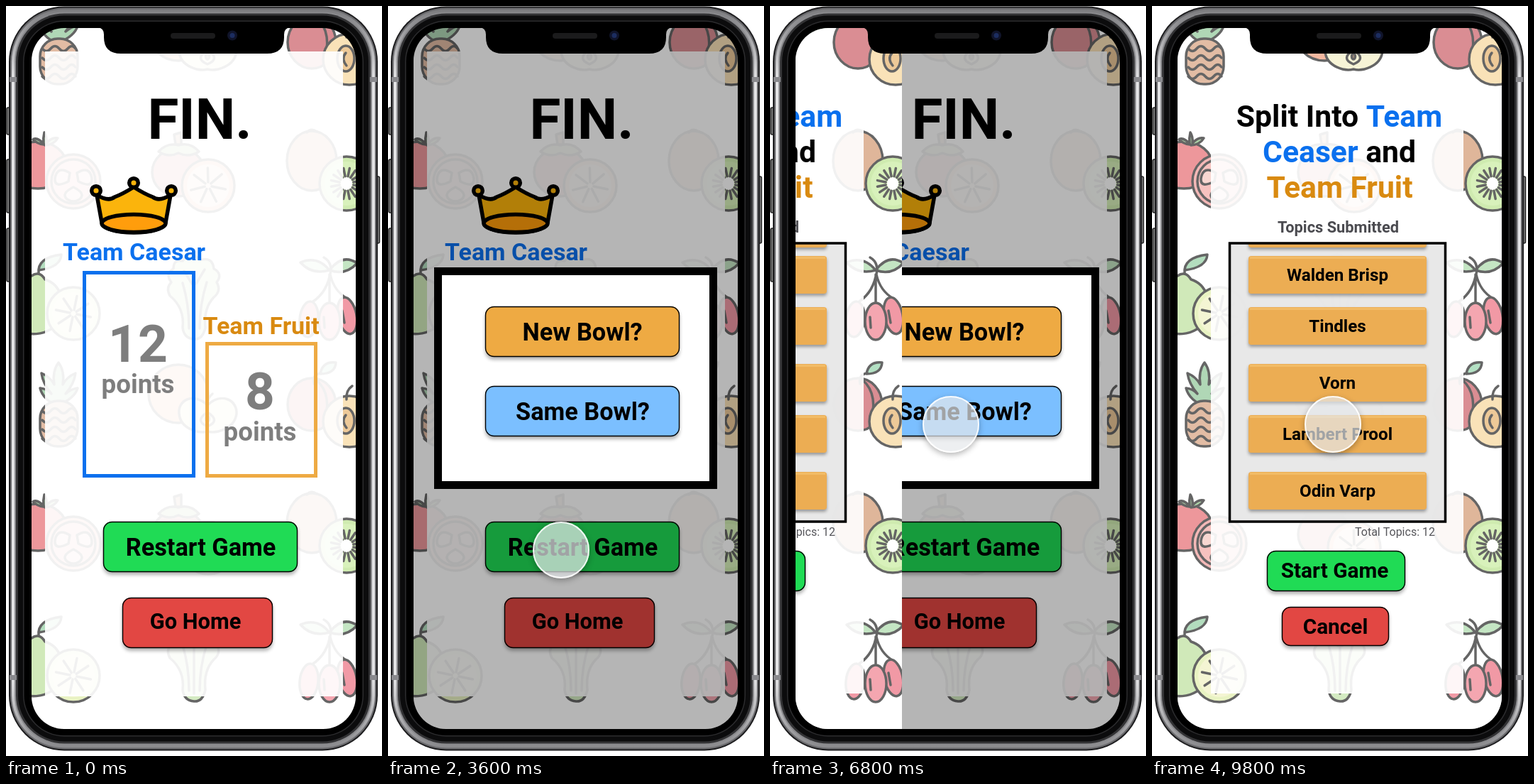
These frames come from a looping animation (530 by 1056 pixels, 9.9 s). An HTML page with a canvas:

```html
<!DOCTYPE html>
<html lang="en">
<head>
<meta charset="utf-8">
<title>Bowl game</title>
<style>
html, body { margin: 0; width: 100%; height: 100%; overflow: hidden; background: #fff; }
canvas { display: block; }
</style>
</head>
<body>
<canvas id="stage" width="530" height="1056"></canvas>
<script>
const W = 530, H = 1056, LOOP = 9900, STEP = 100;
const SCREEN = { x: 36, y: 31, w: 457, h: 987, r: 46 };
const BLUE = '#0a70ee', GOLD = '#d98a10', ORANGE = '#eeaa43', GREEN = '#20db55', RED = '#e24743';
const stage = document.getElementById('stage').getContext('2d');
let g = stage;

function box(x, y, w, h, r, fill, line, lw) {
  g.beginPath();
  g.roundRect(x, y, w, h, r);
  if (fill) { g.fillStyle = fill; g.fill(); }
  if (line) { g.strokeStyle = line; g.lineWidth = lw; g.stroke(); }
}

function text(str, x, y, size, color = '#000', weight = 700, align = 'center') {
  g.font = `${weight} ${size}px Roboto, sans-serif`;
  g.textAlign = align;
  g.fillStyle = color;
  g.fillText(str, x, y);
}

// Several coloured runs on one centred line
function runs(parts, cx, y, size) {
  g.font = `700 ${size}px Roboto, sans-serif`;
  const widths = parts.map(p => g.measureText(p[0]).width);
  let x = cx - widths.reduce((a, b) => a + b) / 2;
  parts.forEach(([str, color], i) => {
    text(str, x, y, size, color, 700, 'left');
    x += widths[i];
  });
}

function shadow(draw, alpha = 0.3, dy = 4, blur = 5) {
  g.save();
  g.shadowColor = `rgba(0,0,0,${alpha})`;
  g.shadowOffsetY = dy;
  g.shadowBlur = blur;
  draw();
  g.restore();
}

function button(x, y, w, h, fill, label, cx, base, size) {
  shadow(() => box(x, y, w, h, 12, fill));
  box(x + 0.5, y + 0.5, w - 1, h - 1, 12, null, '#000', 1.4);
  text(label, cx, base, size);
}

function layer(draw) {
  const c = document.createElement('canvas');
  c.width = W;
  c.height = H;
  const before = g;
  g = c.getContext('2d');
  draw();
  g = before;
  return c;
}

// ---- Fruit pattern ----
function oval(x, y, rx, ry, fill, rot = 0, line = true) {
  g.beginPath();
  g.ellipse(x, y, rx, ry, rot, 0, 7);
  if (fill) { g.fillStyle = fill; g.fill(); }
  if (line) g.stroke();
}

function shape(d, fill) {
  const p = new Path2D(d);
  if (fill) { g.fillStyle = fill; g.fill(p); }
  g.stroke(p);
}

function spokes(x, y, r0, r1, n) {
  for (let i = 0; i < n; i++) {
    const a = i * 2 * Math.PI / n + 0.2, c = Math.cos(a), s = Math.sin(a);
    g.beginPath();
    g.moveTo(x + c * r0, y + s * r0);
    g.lineTo(x + c * r1, y + s * r1);
    g.stroke();
  }
}

function slice(x, y, rim, flesh, n) {
  oval(x, y, 37, 37, rim);
  oval(x, y, 30, 30, flesh, 0, false);
  spokes(x, y, 5, 25, n);
}

function stoneRow() {
  // pineapple
  shape('M74 562C62 560 51 550 48 538Q58 539 64 546Q52 532 50 517Q62 522 68 533Q65 514 74 502Q83 514 80 533Q86 522 98 517Q96 532 84 546Q92 539 101 538Q97 552 74 562Z', '#7cbd86');
  box(48, 556, 53, 64, 25, '#d09168', '#000', 3.5);
  for (let y = 570; y < 615; y += 13)
    shape(`M51 ${y}q6 7 12 0t12 0t12 0t11 0`);
  // apricot and apple half
  oval(243, 546, 42, 41, '#ef8c62');
  shape('M284 562C264 543 242 555 244 574C246 596 272 602 284 599C296 602 322 596 325 574C326 555 304 543 284 562Z', '#f2eebc');
  shape('M284 572q-19 12 0 20q19-8 0-20ZM284 560q0-8 7-14');
  oval(284, 581, 2.5, 4, '#80502a');
  // plum and its half
  shape('M443 518Q446 500 465 502Q464 518 443 518Z', '#82cc9c');
  oval(431, 561, 34, 37, '#c2424c');
  shape('M434 532Q431 519 444 517M438 527Q461 547 448 592');
  oval(484, 585, 37, 36, '#f6cf8a');
  shape('M480 554Q479 541 488 535');
  oval(479, 584, 12, 18, '#e2a655');
  shape('M479 576Q472 584 480 594');
}

function kiwiRow() {
  // tomato and its half
  oval(45, 224, 40, 33, '#e2535a');
  shape('M53 194Q44 184 38 188Q44 194 53 195Q52 186 54 178Q58 184 57 193Q65 184 73 186Q68 195 55 196Z', '#78b870');
  oval(95, 247, 38, 38, '#ee8a88');
  oval(95, 247, 31, 31, '#f19a96');
  shape('M90 235Q72 224 69 243Q68 257 88 247ZM100 235Q118 224 121 243Q122 257 102 247ZM95 255Q77 264 86 272Q95 278 104 272Q113 264 95 255Z', '#f5bdb4');
  // mangosteen and citrus half
  oval(243, 234, 37, 34, '#c46064');
  shape('M215 205Q227 192 243 196Q260 191 272 205Q258 214 243 207Q229 214 215 205Z', '#90bd75');
  shape('M239 195L237 181L247 178L247 195Z', '#b18055');
  slice(285, 253, '#e89a72', '#f5d0b6', 7);
  // kiwi and its half
  oval(431, 218, 35, 42, '#cb8658');
  shape('M424 178Q430 171 438 177');
  oval(480, 250, 38, 38, '#b0de7c');
  oval(480, 250, 31, 31, '#bfe98e', 0, false);
  spokes(480, 250, 10, 22, 16);
  oval(480, 250, 8, 9, '#fff', 0, false);
}

function greenRow() {
  // lime and its half
  shape('M46 376Q44 354 78 350Q77 368 46 372Z', '#82c894');
  shape('M36 380Q47 372 55 385C78 392 85 420 76 440C66 466 20 470 8 445C-6 410 12 386 36 380Z', '#b2dc8c');
  slice(95, 433, '#dcec9c', '#edf0b6', 8);
  // lettuce
  shape('M249 453Q252 425 231 408Q225 397 233 389Q224 377 236 370Q236 356 249 359Q261 342 273 358Q291 352 293 370Q306 377 297 389Q304 401 293 410Q278 426 281 453Q277 470 265 469Q251 468 249 453Z', '#b8df9a');
  shape('M258 454Q258 420 249 390M265 458L265 376M273 454Q273 420 283 389M251 373L262 391M280 371L268 391');
  // berries on stems
  shape('M456 372Q431 379 415 361Q439 351 456 372ZM456 372Q474 348 495 362Q479 380 456 372Z', '#9dd49c');
  shape('M448 354Q462 362 456 381Q450 407 428 419M456 378L456 420M457 378Q462 401 481 412');
  oval(427, 441, 13, 25, '#e9566a', 0.1);
  oval(481, 436, 13, 26, '#e9566a', -0.2);
  oval(456, 444, 15, 26, '#ed6c7c');
  shape('M448 438L449 453M474 429L477 446');
}

const pattern = layer(() => {
  g.strokeStyle = '#000';
  g.lineWidth = 3.5;
  g.lineCap = g.lineJoin = 'round';
  [[stoneRow, -510], [stoneRow, 0], [kiwiRow, 0], [kiwiRow, 510], [greenRow, 0], [greenRow, 510]]
    .forEach(([row, dy]) => {
      g.save();
      g.translate(0, dy);
      row();
      g.restore();
    });
});

function backdrop(x, y, w, h) {
  g.beginPath();
  g.rect(SCREEN.x, SCREEN.y, SCREEN.w, SCREEN.h);
  g.clip();
  g.fillStyle = '#fff';
  g.fillRect(0, 0, W, H);
  g.globalAlpha = 0.6;
  g.drawImage(pattern, 0, 0);
  g.globalAlpha = 1;
  g.fillStyle = 'rgba(255,255,255,.91)';
  g.fillRect(x, y, w, h);
}

// ---- Screens ----
function crown() {
  g.save();
  g.strokeStyle = '#000';
  g.lineWidth = 5.5;
  g.lineJoin = 'round';
  shape('M135 305L128 266Q144 276 153 269Q164 265 180 255Q196 265 207 269Q216 276 232 266L225 305Q219 319 180 319Q141 319 135 305Z', '#fbb40c');
  oval(180, 306, 45, 12.5, '#ff9d0c');
  [[127, 260], [180, 249], [233, 260]].forEach(([x, y]) => oval(x, y, 6.3, 6.3, '#fbb40c'));
  g.restore();
}

function score(x, y, w, h, color, points, cx, base) {
  box(x + 2.5, y + 2.5, w - 5, h - 5, 0, null, color, 5);
  text(points, cx, base, 73, '#7e7e7e');
  text('points', cx, base + 44.5, 36.7, '#7e7e7e');
}

const result = layer(() => {
  backdrop(55, 64, 420, 908);
  text('FIN.', 273, 187, 80);
  crown();
  text('Team Caesar', 180.5, 358, 34, BLUE);
  text('Team Fruit', 359.5, 461.5, 34, GOLD);
  score(108, 373, 159, 291, BLUE, '12', 186, 500.5);
  score(281, 473, 158, 191, ORANGE, '8', 358, 567.5);
  button(137, 726, 274, 71, GREEN, 'Restart Game', 274.5, 773.5, 34.3);
  button(164, 833, 212, 71, RED, 'Go Home', 267, 877, 30.8);
});

const dialog = layer(() => {
  g.fillStyle = 'rgba(0,0,0,.29)';
  g.fillRect(SCREEN.x, SCREEN.y, SCREEN.w, SCREEN.h);
  box(70.5, 373.5, 388, 301, 0, '#fff', '#000', 11);
  button(137, 423, 274, 71, ORANGE, 'New Bowl?', 274, 471, 34.3);
  button(137, 535, 274, 71, '#7bbfff', 'Same Bowl?', 274.5, 583, 34.3);
});

function topic(y, label) {
  shadow(() => box(136, y, 251, 53, 4, '#ecad53'), 0.35, 3, 4);
  g.fillStyle = 'rgba(255,220,150,.3)';
  g.fillRect(138, y + 1, 247, 3);
  text(label, 261.5, y + 35, 24.2);
}

const lobby = layer(() => {
  backdrop(83, 125, 356, 843);
  runs([['Split Into ', '#000'], ['Team', BLUE]], 264, 170, 42.7);
  runs([['Ceaser', BLUE], [' and', '#000']], 264, 220, 42.7);
  text('Team Fruit', 264.5, 270, 42.7, GOLD);
  text('Topics Submitted', 262.5, 319, 21.8, '#4b4b50');
  box(109.5, 334, 304, 392, 0, 'rgba(230,230,230,.92)');
  g.save();
  g.beginPath();
  g.rect(110, 334, 303, 392);
  g.clip();
  topic(287, '');
  topic(352, 'Walden Brisp');
  topic(424, 'Tindles');
  topic(504, 'Vorn');
  topic(576, 'Lambert Prool');
  topic(656, 'Odin Varp');
  g.restore();
  box(109.5, 334, 304, 392, 0, null, '#000', 3.5);
  text('Total Topics: 12', 342.5, 746, 16, '#55555a', 400);
  button(162, 767, 195, 57, GREEN, 'Start Game', 257.5, 805, 29.8);
  button(183, 846, 151, 55, RED, 'Cancel', 258.5, 884, 29.8);
});

// ---- Phone ----
const phone = layer(() => {
  [[143, 38], [216, 75], [313, 75]].forEach(([y, h]) => box(1, y, 6, h, 2, '#777', '#222', 1.5));
  box(521, 240, 5.5, 94, 2, '#777', '#222', 1.5);
  // steel is bright along the sides, darker at both ends
  const steel = g.createLinearGradient(0, 0, 0, 1049);
  [[0, '#77777a'], [0.1, '#e4e4e6'], [0.9, '#e4e4e6'], [1, '#858588']]
    .forEach(([at, color]) => steel.addColorStop(at, color));
  const chrome = [[0, '#1c1c1e'], [2, '#69696c'], [4, steel], [8, '#8a8a8d'],
    [10, '#333335'], [13, '#0c0c0d'], [20, '#2c2c2e'], [21.5, '#000']];
  chrome.forEach(([d, color]) => box(4 + d, 0.5 + d, 520 - 2 * d, 1048 - 2 * d, 78 - d, color));
  g.fillStyle = '#8a8a8e';
  [100, 942].forEach(y => [5, 513].forEach(x => g.fillRect(x, y, 10, 7)));
});

const notch = layer(() => {
  g.fillStyle = '#000';
  g.fill(new Path2D('M129 30Q138 31 138 40V44Q138 67 162 67H368Q392 67 392 44V40Q392 31 401 30Z'));
  box(232, 38, 63, 8, 4, '#1b1b1c');
  oval(319, 41.5, 7, 7, '#10142a', 0, false);
  oval(319, 41.5, 3.5, 3.5, '#1c2d60', 0, false);
});

// ---- Motion ----
const clamp = v => Math.min(1, Math.max(0, v));
const smooth = v => v * v * (3 - 2 * v);
const mix = (a, b, k) => a + (b - a) * k;

// cubic-bezier(.42, 0, 1, 1)
function easeIn(u) {
  let lo = 0, hi = 1;
  for (let i = 0; i < 24; i++) {
    const s = (lo + hi) / 2, q = 1 - s;
    if (1.26 * s * q * q + 3 * s * s * q + s * s * s < u) lo = s; else hi = s;
  }
  return smooth(lo);
}

function arrow(t) {
  const k = smooth(clamp((t - 700) / 900));
  g.save();
  g.translate(mix(262, 244, k), mix(950, 764, k));
  g.lineJoin = 'round';
  g.strokeStyle = '#fff';
  g.lineWidth = 4;
  const d = 'M0 0V25L6 19.5L10.5 30L15 28L10.8 18H18.5Z';
  shadow(() => shape(d), 0.35, 2, 3);
  g.fillStyle = '#000';
  g.fill(new Path2D(d));
  g.restore();
}

function touch(t) {
  const k = smooth(clamp((t - 4200) / 1000));
  const x = mix(244, 255, k), y = mix(766, 589, k);
  g.save();
  g.beginPath();
  g.rect(0, 0, W, H);
  g.arc(x, y, 40, 0, 7);
  g.clip('evenodd');
  shadow(() => oval(x, y, 40, 40, '#fff', 0, false), 0.3, 3, 8);
  g.restore();
  g.strokeStyle = 'rgba(255,255,255,.9)';
  g.lineWidth = 2;
  oval(x, y, 39, 39, 'rgba(230,232,235,.7)');
}

function draw(t) {
  g.fillStyle = '#fff';
  g.fillRect(0, 0, W, H);
  g.drawImage(phone, 0, 0);
  g.save();
  g.beginPath();
  g.roundRect(SCREEN.x, SCREEN.y, SCREEN.w, SCREEN.h, SCREEN.r);
  g.clip();
  g.drawImage(result, 0, 0);
  if (t >= 3300) g.drawImage(dialog, 0, 0);
  const slide = easeIn(clamp((t - 5776) / 2000));
  if (slide > 0) g.drawImage(lobby, Math.round((slide - 1) * SCREEN.w), 0);
  g.restore();
  g.drawImage(notch, 0, 0);
  if (t >= 3200) touch(t);
  else if (t >= 700) arrow(t);
}

const start = performance.now();
function tick() {
  const t = (performance.now() - start) % LOOP;
  draw(Math.floor(t / STEP) * STEP);
  requestAnimationFrame(tick);
}
tick();
</script>
</body>
</html>
```
